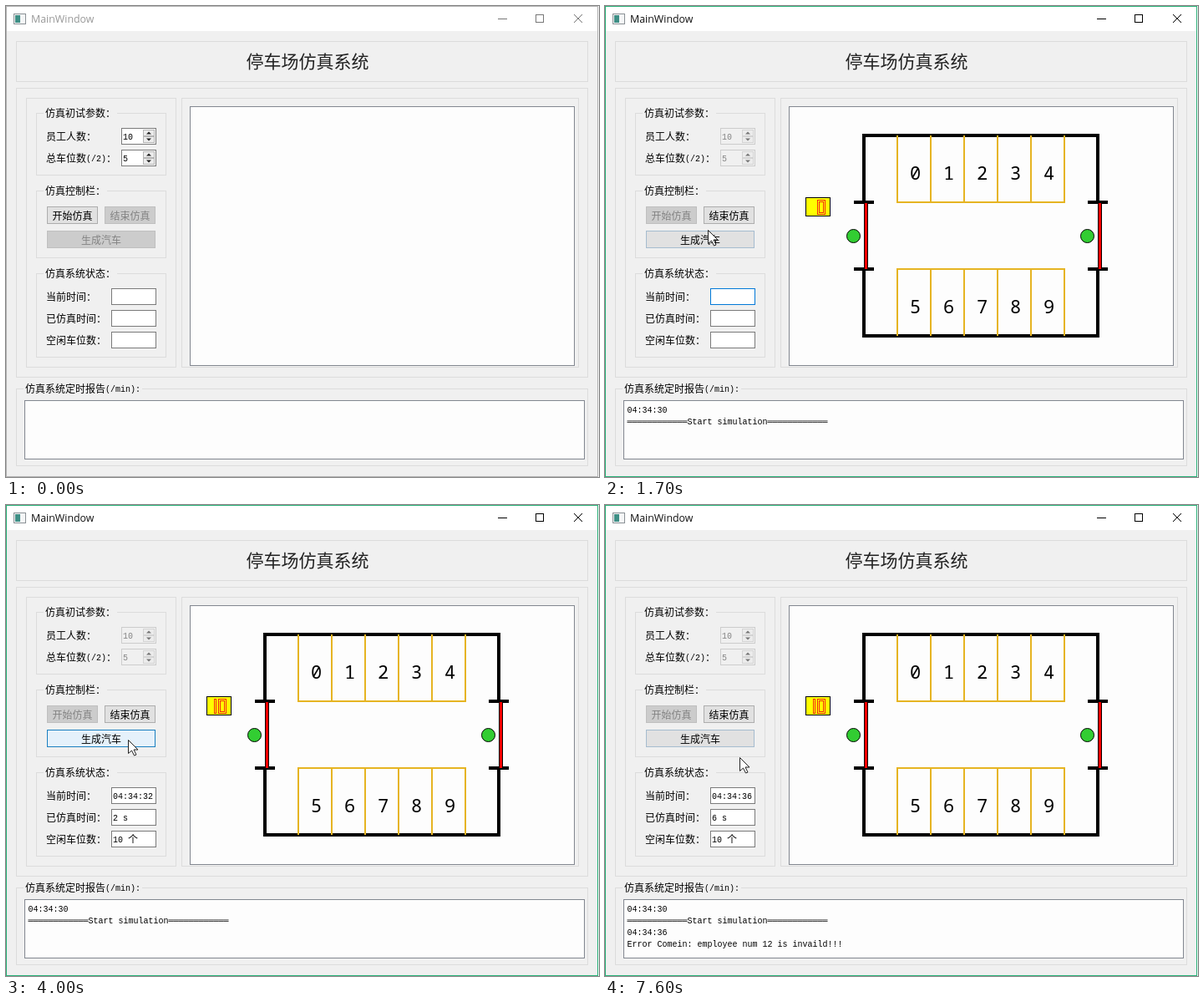
These frames come from a looping animation (710 by 564 pixels, 8000 ms). An HTML page with a canvas:

```html
<!DOCTYPE html>
<html lang="zh">
<head>
<meta charset="utf-8">
<style>
html, body { margin: 0; width: 710px; height: 564px; overflow: hidden; }
canvas { display: block; }
</style>
</head>
<body>
<canvas id="stage" width="710" height="564"></canvas>
<script>
const c = document.getElementById('stage').getContext('2d');
const LOOP = 8000, STEP = 100, START = 1500, ACTIVATE = 1400;
const CJK = '"Noto Sans CJK SC", "Noto Sans CJK", sans-serif';
const MONO = '"Liberation Mono", monospace';
const DIGITS = '22px "Noto Sans Mono", monospace';
const ROW = 26, SLOT = 40;

const progress = (t, from, to) => Math.min(1, Math.max(0, (t - from) / (to - from)));

// The pointer visits each button, resting between glides
function pointerAt(t) {
  let x = 720, y = 570;
  const glide = (k, tx, ty) => { x += (tx - x) * k; y += (ty - y) * k; };
  glide(1 - (1 - progress(t, 0, 900)) ** 2, 92, 254);
  glide(progress(t, START, 2100), 184, 295);
  glide(progress(t, 3000, 3600), 146, 281);
  glide(progress(t, 6700, 7000), 161, 302);
  return [Math.round(x), Math.round(y)];
}

function fill(x, y, w, h, color) {
  c.fillStyle = color;
  c.fillRect(x, y, w, h);
}

// Bordered box; the border lies inside the given size
function box(x, y, w, h, border, color) {
  if (color) fill(x, y, w, h, color);
  c.strokeStyle = border;
  c.lineWidth = 1;
  c.strokeRect(x + .5, y + .5, w - 1, h - 1);
}

function line(color, width, x0, y0, x1, y1) {
  c.strokeStyle = color;
  c.lineWidth = width;
  c.beginPath();
  c.moveTo(x0, y0);
  c.lineTo(x1, y1);
  c.stroke();
}

function shape(color, border) {
  c.fillStyle = color;
  c.fill();
  c.strokeStyle = border;
  c.lineWidth = 1;
  c.stroke();
}

function write(s, x, y, font, color = '#000') {
  c.font = font;
  c.fillStyle = color;
  c.fillText(s, x, y);
}

// Interface text mixes 12px Chinese characters with 6px Latin ones
const isWide = ch => /[\u4e00-\u9fff：]/.test(ch);
const labelWidth = s => [...s].reduce((w, ch) => w + (isWide(ch) ? 12 : 6), 0);

function label(s, x, cy, color) {
  for (const run of s.match(/[\u4e00-\u9fff：]+|[^\u4e00-\u9fff：]+/g) || []) {
    const wide = isWide(run[0]);
    write(run, x, cy + (wide ? 4.5 : 4), wide ? '12px ' + CJK : '10px ' + MONO, color);
    x += labelWidth(run);
  }
}

function group(x, y, w, h, title) {
  box(x, y, w, h, '#dcdcdc');
  if (!title) return;
  fill(x + 9, y, labelWidth(title) + 4, 1, '#f0f0f0');
  label(title, x + 11, y);
}

function spin(cy, value, enabled) {
  box(138, cy - 10, 42, 20, enabled ? '#7a7a7a' : '#ccc', enabled ? '#fff' : '#f0f0f0');
  label(value, 140, cy, enabled ? '#000' : '#838383');
  for (const dir of [-1, 1]) {
    const my = cy + dir * 4;
    box(164, my - 4, 14, 8, enabled ? '#b5b5b5' : '#d4d4d4', '#ececec');
    c.fillStyle = enabled ? '#222' : '#777';
    c.beginPath();
    c.moveTo(168, my - dir * 1.5);
    c.lineTo(174, my - dir * 1.5);
    c.lineTo(171, my + dir * 1.5);
    c.fill();
  }
}

function button(x, y, w, text, enabled, pressed, [px, py], idle = '#adadad') {
  const h = 21, hover = px >= x && px < x + w && py >= y && py < y + h;
  const [border, color] = !enabled ? ['#bfbfbf', '#ccc']
    : pressed ? ['#005499', '#cce4f7']
    : hover ? ['#1a7fc0', '#e5f1fb'] : [idle, '#e1e1e1'];
  box(x, y, w, h, border, color);
  label(text, x + (w - labelWidth(text)) / 2, y + 11, enabled ? '#000' : '#838383');
}

function titleBar(active) {
  const ink = active ? '#000' : '#777';
  fill(0, 0, 710, 30, '#fff');
  box(9, 9, 15, 13, '#8a9095', '#f4f6f7');
  fill(11, 11, 6, 9, '#3f8f86');
  write('MainWindow', 30, 20, '12.4px "Open Sans", "Noto Sans", sans-serif', active ? '#111' : '#999');
  line(ink, 1, 589, 15.5, 600, 15.5);
  box(634, 10, 10, 10, ink);
  line(ink, 1, 680, 10, 690, 20);
  line(ink, 1, 690, 10, 680, 20);
}

// Hollow seven-segment style digits
function counter(value) {
  const red = '#f32a10';
  box(240, 229, 30, 23, '#000', '#ff0');
  box(254, 232, 10, 18, red);
  box(256, 234, 6, 14, red);
  if (value === 10) box(249, 232, 3, 18, red);
}

function parkingLot(free, car) {
  const gold = '#e6b422';
  for (const y of [155, 395]) line('#000', 4, 308, y, 592, y);
  for (const x of [310, 590]) {
    for (const y of [155, 315]) line('#000', 4, x, y, x, y + 80);
    for (const y of [235, 315]) line('#000', 4, x - 12, y, x + 12, y);
  }
  for (const [row, y] of [155, 315].entries()) {
    line(gold, 2, 349, row ? y : y + 80, 551, row ? y : y + 80);
    for (let i = 0; i <= 5; i++) {
      const x = 350 + SLOT * i;
      line(gold, 2, x, y, x, y + 80);
      if (i < 5) write(row * 5 + i, x + 15, y + 53, DIGITS);
    }
  }
  for (const x of car ? [577.5] : [297.5, 577.5]) {
    c.beginPath();
    c.arc(x, 275.5, 8, 0, 7);
    shape('#32cd32', '#000');
  }
  if (car) {
    box(270, 255, SLOT + 1, SLOT + 1, '#000', '#40e0d0');
    write('12', 270, 284, DIGITS);
  }
  for (const x of [310, 590]) box(x, 235, 5, 81, '#000', '#f00');
  counter(free);
}

function pointer([x, y]) {
  c.save();
  c.translate(x + .5, y + .5);
  c.stroke(new Path2D());
  const arrow = new Path2D('M0 0V16L4 12.5L7 18.5L9.5 17.5L6.5 11.5H11.5Z');
  c.fillStyle = '#fff';
  c.fill(arrow);
  c.strokeStyle = '#222';
  c.lineWidth = 1;
  c.stroke(arrow);
  c.restore();
}

function controls(t, running, seconds, clock, mouse) {
  group(36, 128, 156, 75, '仿真初试参数：');
  ['员工人数：', '总车位数(/2)：'].forEach((s, i) => {
    label(s, 48, 156 + ROW * i);
    spin(156 + ROW * i, ['10', '5'][i], !running);
  });

  group(36, 221, 156, 81, '仿真控制栏：');
  button(49, 240, 61, '开始仿真', !running, t >= ACTIVATE, mouse);
  button(118, 240, 61, '结束仿真', running, false, mouse);
  button(49, 269, 130, '生成汽车', running, false, mouse, '#a5bccf');

  group(36, 320, 156, 101, '仿真系统状态：');
  const values = seconds ? [clock(seconds), seconds + ' s', '10 个'] : ['', '', ''];
  ['当前时间：', '已仿真时间：', '空闲车位数：'].forEach((s, i) => {
    const cy = 348 + ROW * i, focused = i === 0 && running && t < 3600;
    label(s, 48, cy);
    box(126, cy - 10, 54, 20, focused ? '#0078d7' : '#7a7a7a', '#fff');
    label(values[i], 128, cy);
  });
}

function draw(t) {
  const active = t >= ACTIVATE, running = t >= START;
  const seconds = running ? Math.floor((t - START) / 1000) : 0;
  const clock = n => '04:34:' + (30 + n);
  const mouse = pointerAt(t);

  fill(0, 0, 710, 564, '#f0f0f0');
  titleBar(active);
  group(12, 42, 685, 49);
  write('停车场仿真系统', 287.5, 74, '300 21px ' + CJK, '#222');
  group(12, 98, 685, 347);
  group(24, 110, 180, 323);
  group(210, 110, 476, 323);
  controls(t, running, seconds, clock, mouse);

  box(220, 120, 461, 311, '#828790', '#fdfdfd');
  if (running) parkingLot(seconds ? 10 : 0, seconds >= 4 && seconds < 6);

  group(12, 458, 685, 93, '仿真系统定时报告(/min):');
  box(22, 472, 671, 71, '#828790', '#fdfdfd');
  const rule = '═'.repeat(12);
  const log = running ? [clock(0), rule + 'Start simulation' + rule] : [];
  if (seconds >= 6) log.push(clock(6), 'Error Comein: employee num 12 is invaild!!!');
  log.forEach((s, i) => label(s, 26.5, 483 + 14 * i));

  fill(709, 0, 1, 564, '#f6f6f6');
  box(0, 0, 709, 564, active ? '#2bb27a' : '#b4b4b4');
  if (t >= STEP) pointer(mouse);
}

function tick() {
  draw(Math.floor(performance.now() % LOOP / STEP) * STEP);
  requestAnimationFrame(tick);
}
tick();
</script>
</body>
</html>
```
